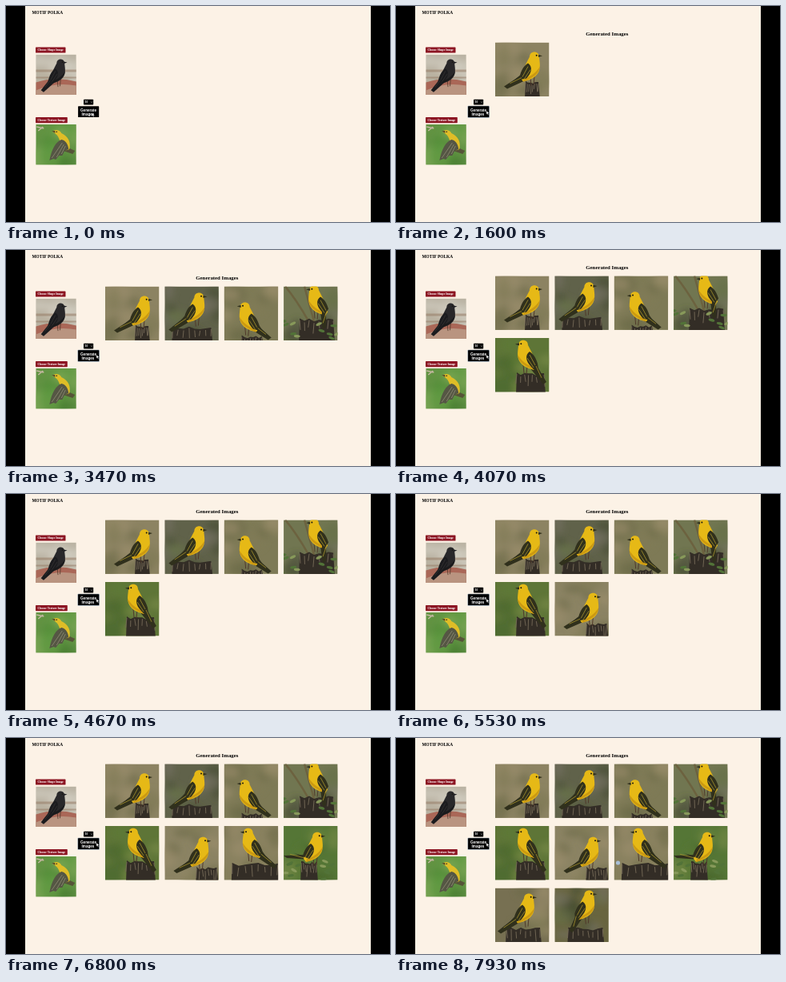
Write an HTML page that moves like this. It is 480 px wide and 270 px high and loops after 8 s.

```html
<!DOCTYPE html>
<html lang="en">
<head>
<meta charset="utf-8">
<title>Image generator</title>
<style>
  html, body { margin: 0; width: 100%; height: 100%; overflow: hidden; background: #000; }
  #stage { display: block; width: 480px; height: 270px; }
  text { font-family: "Liberation Serif", serif; font-weight: bold; }
  .ui { font-family: "Liberation Sans", sans-serif; fill: #fff; text-anchor: middle; }
</style>
</head>
<body>
<svg id="stage" viewBox="0 0 480 270">
  <defs>
    <filter id="soft" x="-60%" y="-60%" width="220%" height="220%"><feGaussianBlur stdDeviation="4"/></filter>
  </defs>
  <rect width="480" height="270"/>
  <rect x="24" width="432" height="270" fill="#fcf2e6"/>
  <text x="32.5" y="9.6" font-size="5.4">MOTIF POLKA</text>
  <g fill="#8c1522">
    <rect x="37" y="51.4" width="37.5" height="7.2" rx=".7"/>
    <rect x="37" y="139" width="39.8" height="7.2" rx=".7"/>
  </g>
  <g fill="#fff" font-size="3.65">
    <text x="39.5" y="56.2">Choose Shape Image</text>
    <text x="39.5" y="143.8">Choose Texture Image</text>
  </g>
  <g id="inputs"></g>
  <rect x="97" y="116.8" width="12.2" height="6.8" rx=".8"/>
  <text class="ui" x="100.5" y="121.3" font-size="3.2">10</text>
  <path d="M106 119.5l1 1.2 1-1.2" fill="none" stroke="#ddd" stroke-width=".5"/>
  <rect id="ring" x="89.5" y="124.7" width="27.3" height="15" rx="1" fill="#8b9cac"/>
  <rect x="90.1" y="125.3" width="26.1" height="13.8" rx=".6"/>
  <text class="ui" x="103" y="131.5" font-size="4.6">Generate</text>
  <text class="ui" x="102.5" y="136.8" font-size="4.6">Images</text>
  <g id="results">
    <text x="237.3" y="24" font-size="6.8">Generated Images</text>
    <g id="thumbs"></g>
  </g>
  <path id="pointer" d="M0 0v4.4l1.1-1 .8 1.7.8-.4-.8-1.6h1.5z" fill="#fff" stroke="#222" stroke-width=".3"/>
  <circle id="busy" cx="277.5" cy="156" r="2.6" fill="#a9bfd6"/>
</svg>
<script>
const LOOP = 8000, FIRST = 1110, EVERY = 740, SIZE = 67.5;
const get = id => document.getElementById(id);

function seeded(seed) {
  return () => (seed = (seed * 16807) % 2147483647) / 2147483647;
}

function backdrop(size, base, tones, seed) {
  const rnd = seeded(seed * 7919 + 17);
  let blobs = '';
  for (let i = 0; i < 11; i++) {
    blobs += `<ellipse cx="${rnd() * size}" cy="${rnd() * size}" rx="${6 + rnd() * 12}" ry="${5 + rnd() * 10}"
      fill="${tones[i % tones.length]}" opacity=".6"/>`;
  }
  return `<rect width="${size}" height="${size}" fill="${base}"/><g filter="url(#soft)">${blobs}</g>`;
}

function stump(left, right, top, seed) {
  const rnd = seeded(seed * 131 + 5), step = (right - left) / 7;
  let edge = `M${left - 1} 70`, grain = '';
  for (let i = 0; i <= 7; i++) {
    const x = left + i * step, y = top + rnd() * 4;
    edge += `L${x} ${y}`;
    grain += `M${x} ${y + 2}l${rnd() * 3 - 1.5} ${6 + rnd() * 9}`;
  }
  return `<path d="${edge}L${right + 2} 70z" fill="#332d26"/>
    <path d="${grain}" stroke="#776b59" stroke-width=".9" fill="none"/>`;
}

// A perched bird facing right; (x, y) is the head, (tx, ty) the tail tip in units of the head.
function bird(x, y, tx, ty, body = '#e6b916', wing = '#30301c', bar = '#a9952f') {
  const shade = body === '#e6b916' ? '#c18c10' : '#151516';
  return `<g transform="translate(${x} ${y})">
    <path d="M-5 26l1 10M0 24l-1 11" stroke="#50392a" stroke-width="1"/>
    <path d="M-15 22L${tx - 2} ${ty - 2}l4 3L-8 28z" fill="${wing}"/>
    <path d="M-6 0C-6-8 5-8 6-1C6 5 8 10 6 17C4 24-4 29-14 31L-17 27C-16 18-10 8-6 0z" fill="${body}"/>
    <path d="M7 12C6 21-2 27-14 31L-13 27C-5 25 2 20 7 12z" fill="${shade}" opacity=".7"/>
    <path d="M-8 8C-2 12-3 20-10 27L${tx * .75} ${ty * .78}L-18 23C-16 16-13 11-8 8z" fill="${wing}"/>
    <path d="M-8 12L-15 25M-5 16L-13 28M-16 26L${tx * .85} ${ty * .85}" stroke="${bar}" stroke-width=".8"/>
    <path d="M5-2.7L10-1.3 5 .5z" fill="${wing}"/>
    <circle cx="2.7" cy="-1.8" r="1" fill="#17150f"/>
  </g>`;
}

const frame = (x, y, size, art) => `<svg x="${x}" y="${y}" width="${size}" height="${size}"
  viewBox="0 0 ${size} ${size}" overflow="hidden">${art}</svg>`;
const mirror = art => `<g transform="translate(${SIZE}) scale(-1 1)">${art}</g>`;

const olive = ['#6d6b48', '#9b8e6c', '#817c57'];
const green = ['#47662c', '#7b8c48', '#5d7c36'];
const dusk = ['#444b30', '#747263', '#67714a'];

// base, tones, faces left, head x, head y, tail dx, tail dy, perch left, right, top
const photos = [
  ['#8c8362', olive, 0, 49, 18, -36, 39, 38, 54, 48],
  ['#60624a', dusk, 0, 43, 14, -36, 42, 10, 58, 50],
  ['#7e7a56', olive, 1, 26, 26, -31, 40, 22, 47, 61],
  ['#717651', dusk, 1, 38, 5, -13, 48, 20, 62, 40],
  ['#5e7537', green, 1, 35, 9, -27, 48, 27, 61, 43],
  ['#8b8363', olive, 0, 48, 20, -35, 38, 40, 65, 51],
  ['#89815f', olive, 1, 30, 9, -34, 43, 10, 67, 46],
  ['#557636', green, 0, 42, 14, -40, 25, 22, 41, 44],
  ['#777052', olive, 0, 42, 13, -37, 43, 14, 56, 49],
  ['#68653f', dusk, 0, 43, 9, -23, 46, 17, 60, 49]
];

function photo([base, tones, left, hx, hy, tx, ty, from, to, top], i) {
  const figure = bird(left ? SIZE - hx : hx, hy, tx, ty);
  let art = backdrop(SIZE, base, tones, i + 1);
  if (i === 3) art += '<path d="M2 0Q15 15 31 43M26 0L38 44" stroke="#6c623f" stroke-width="2.5" fill="none"/>';
  art += stump(from, to, top, i + 2) + (left ? mirror(figure) : figure);
  if (i === 3 || i === 7) art += leaves(i);
  return frame(124 + 74.35 * (i % 4), 32.4 + 77.6 * Math.floor(i / 4), SIZE, art);
}

function leaves(seed) {
  const rnd = seeded(seed * 971);
  let art = '';
  for (let i = 0; i < 12; i++) {
    const x = i % 2 ? rnd() * 20 : 47 + rnd() * 20;
    art += `<ellipse cx="${x}" cy="${42 + rnd() * 25}" rx="4" ry="1.7"
      transform="rotate(${rnd() * 60 - 30} ${x} 54)" fill="${i % 3 ? '#527338' : '#87995a'}"/>`;
  }
  return art;
}

const shapePhoto = backdrop(50.5, '#b9b2a2', ['#d7d3c8', '#c2b6a4', '#a2a08d'], 31) +
  `<path d="M0 19h51v3H0zM0 28h51v2H0z" fill="#99806c" opacity=".6"/>
  <path d="M0 35Q24 27 51 34V51H0z" fill="#aa6757"/>
  <path d="M0 45Q23 34 51 39V51H0z" fill="#b99480"/>
  <g transform="translate(31 11) scale(.82)">${bird(0, 0, -28, 43, '#29282a', '#1b1b1e', '#3c3938')}</g>`;

const texturePhoto = backdrop(50.5, '#629343', ['#467c30', '#83ad5c', '#5a983d'], 8) +
  `<path d="M1 3l9 2M3 8l6-5" stroke="#c4b7a0" stroke-width="1.5"/>
  <path d="M36 27L49 33 46 37 34 33z" fill="#565438"/>
  <path d="M21 9C23 6 30 6 32 11C41 15 44 23 42 31C37 34 32 31 31 24C30 19 28 15 26 13z" fill="#dfbd27"/>
  <path d="M32 19C25 22 20 30 17 45L22 43 25 44 29 39 33 39 36 33 41 31C40 24 37 20 32 19z" fill="#555644"/>
  <path d="M33 23L20 42M35 25L26 41M37 27L32 37" stroke="#98957c" stroke-width=".7"/>
  <path d="M24 8L20 8.3 24 11z" fill="#50482b"/><circle cx="26" cy="9.2" r=".8" fill="#222"/>`;

get('inputs').innerHTML = frame(37.3, 60.6, 50.5, shapePhoto) + frame(37.3, 148, 50.5, texturePhoto);
get('thumbs').innerHTML = photos.map(photo).join('');

const thumbs = [...get('thumbs').children];
const show = (node, on) => node.style.display = on ? '' : 'none';

function draw(now) {
  const t = now % LOOP;
  const count = Math.floor((t - FIRST) / EVERY) + 1;
  thumbs.forEach((node, i) => show(node, i < count));
  show(get('results'), count > 0);
  get('results').setAttribute('transform', `translate(0 ${count > 4 ? 0 : 13.2})`);
  show(get('ring'), t >= 140);
  show(get('busy'), t >= 7870);
  const p = Math.min(1, t / 600), ease = p * (2 - p);
  get('pointer').setAttribute('transform', `translate(${107.3 + 5.7 * ease} ${133.5 - 2.5 * ease})`);
}

const start = performance.now();
function tick() {
  draw(performance.now() - start);
  requestAnimationFrame(tick);
}
tick();
</script>
</body>
</html>
```
